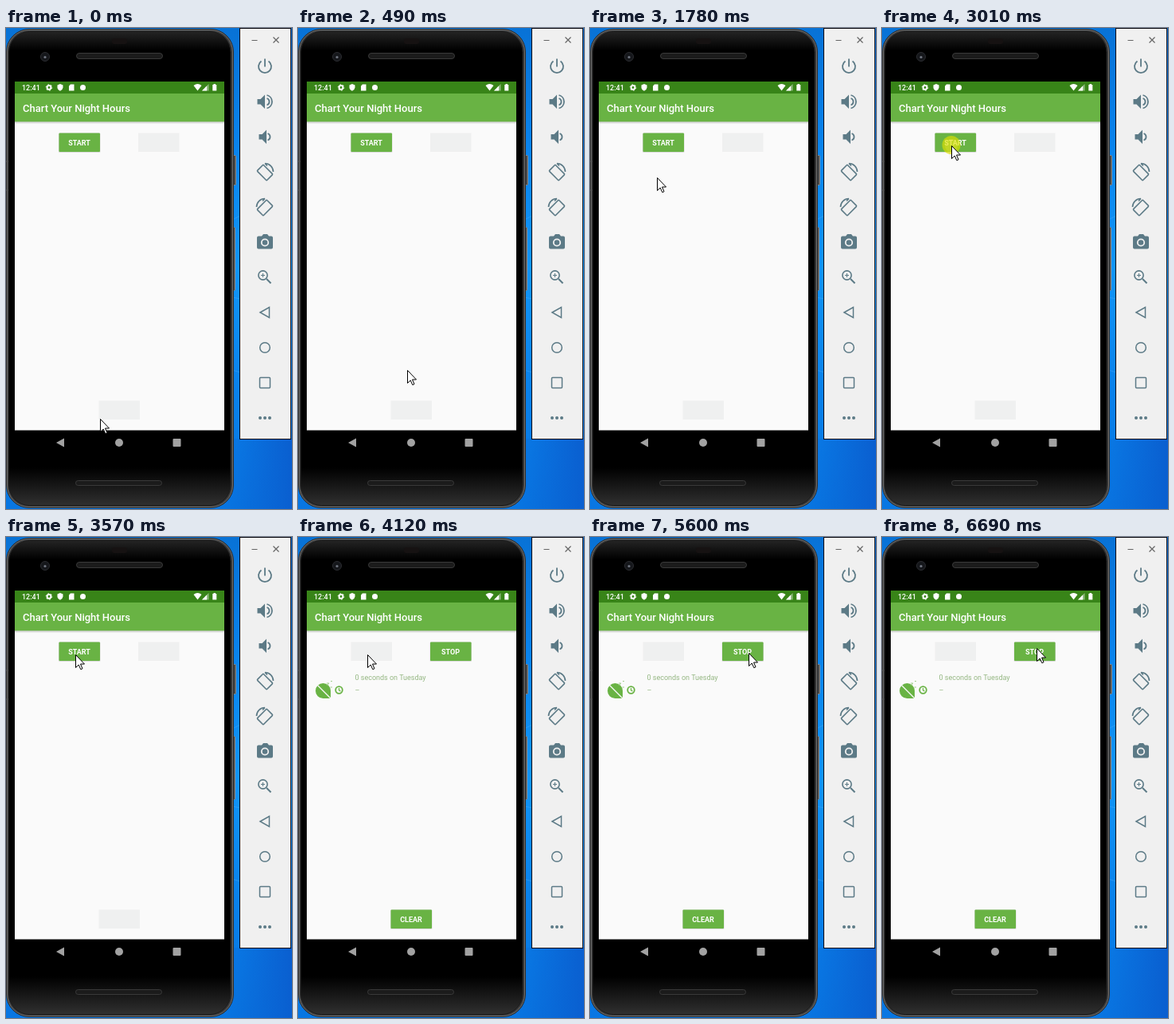
An HTML page for the animation above (8 s loop, 359 px wide and 602 px high).

```html
<!DOCTYPE html>
<html lang="en">
<head>
<meta charset="utf-8">
<title>Sleep tracker demo</title>
<style>
html, body { margin: 0; width: 100%; height: 100%; overflow: hidden; background: #0878e4; }
svg { display: block; width: 359px; height: 602px; }
text { font-family: Roboto, sans-serif; font-size: 9px; }
.label { fill: #fff; font-weight: 700; text-anchor: middle; }
.line { fill: none; stroke: #5c7a86; stroke-width: 1.8; }
.solid { fill: #5c7a86; }
.green { fill: #69b344; }
</style>
</head>
<body>
<svg viewBox="0 0 359 602">
  <defs>
    <linearGradient id="sky" x2="0" y2="1">
      <stop offset="0" stop-color="#0872d6"/>
      <stop offset=".25" stop-color="#0a84ee"/>
      <stop offset=".5" stop-color="#1296f8"/>
      <stop offset=".75" stop-color="#0a82ec"/>
      <stop offset="1" stop-color="#0876e2"/>
    </linearGradient>
    <linearGradient id="dusk">
      <stop offset="0" stop-color="#0a5fd0" stop-opacity="0"/>
      <stop offset="1" stop-color="#0a5fd0"/>
    </linearGradient>
    <linearGradient id="bezel" x2="0" y2="1">
      <stop offset="0" stop-color="#242424"/>
      <stop offset=".04" stop-color="#000"/>
      <stop offset=".92" stop-color="#000"/>
      <stop offset="1" stop-color="#303030"/>
    </linearGradient>
    <linearGradient id="shade" x2="0" y2="1">
      <stop offset="0" stop-color="#000" stop-opacity=".2"/>
      <stop offset="1" stop-color="#000" stop-opacity="0"/>
    </linearGradient>
    <clipPath id="startArea"><rect x="66.500" y="131.500" width="51.500" height="23.500" rx="1"/></clipPath>
  </defs>

  <rect width="359" height="602" fill="url(#sky)"/>
  <rect x="270" y="514" width="89" height="88" fill="url(#dusk)"/>
  <path d="M284 240l10-5M284 337l10 2M284 428l10 3" stroke="#45a6f8" stroke-opacity=".5"/>

  <g id="phone">
    <g fill="#4a4a4a" stroke="#8a8a8a">
      <rect x="284.500" y="159.500" width="4" height="37" rx="1"/>
      <rect x="284.500" y="249.500" width="3" height="79" rx="1"/>
    </g>
    <rect x=".5" y="1.500" width="285" height="599" rx="28.500" fill="#3a3a3a" stroke="#2a2a2a"/>
    <rect x="1.500" y="2.500" width="283" height="597" rx="27.500" fill="none" stroke="#6c6c6c"/>
    <rect x="3.500" y="4.500" width="278.500" height="593" rx="26" fill="url(#bezel)" stroke="#1c1c1c"/>
    <path d="M0 167h3M0 203h3" stroke="#555"/>
    <rect x="133" y="13" width="19" height="7" rx="3" fill="#161212"/>
    <circle cx="49" cy="36" r="5.500" fill="#15171b" stroke="#2b2c30"/>
    <circle cx="49" cy="36.500" r="1.600" fill="#707680"/>
    <g fill="#1b1b1b" stroke="#393939">
      <rect x="88.500" y="31.500" width="108" height="7" rx="3.500"/>
      <rect x="87.500" y="566.500" width="108" height="6" rx="3"/>
    </g>
    <g fill="#a2a2a2">
      <path d="M63 519l10-5.500v11z"/>
      <circle cx="142" cy="519" r="5"/>
      <rect x="209.500" y="514" width="10" height="10" rx="1"/>
    </g>
  </g>

  <g id="screen">
    <rect x="11" y="67" width="263" height="436.500" fill="#fafafa"/>
    <rect x="11" y="67" width="263" height="15" fill="#388418"/>
    <rect x="11" y="82" width="263" height="35.300" class="green"/>
    <rect x="11" y="117.300" width="263" height="3" fill="url(#shade)"/>
    <text x="20" y="78" fill="#fff" font-weight="500">12:41</text>
    <text x="21" y="105" fill="#fff" font-weight="500" style="font-size:13px">Chart Your Night Hours</text>
    <g fill="#fff">
      <circle cx="54" cy="74.500" r="2.400" fill="none" stroke="#fff" stroke-width="2"/>
      <circle cx="54" cy="74.500" r="3.800" fill="none" stroke="#fff" stroke-dasharray="1.500 2.480"/>
      <path d="M68 70l3.500 1.500v3q-.3 3-3.500 4.300q-3.200-1.300-3.500-4.300v-3z"/>
      <path d="M81 70.500h4.500v8h-6.500v-6z"/>
      <circle cx="96.500" cy="74.500" r="3.500"/>
      <path d="M235.500 72q5-4 10 0l-5 6.500z"/>
      <path d="M254.500 70v8.500h-8.500z" fill-opacity=".45"/>
      <path d="M252 72.500v6h-6z"/>
      <path d="M260.500 70h2.500v1h1.300v7.500h-5v-7.500h1.200z"/>
    </g>
    <g id="buttons"></g>
    <g id="record">
      <text x="71.500" y="179" fill="#95b783">0 seconds on Tuesday</text>
      <text x="71.500" y="195" fill="#95b783">–</text>
      <path class="green" d="M41 202H31.500a9.500 9.500 0 1 1 9.500-9.500z"/>
      <path d="M23 184l18 18" stroke="#fafafa" stroke-width="1.300"/>
      <path d="M36 183h3l-3 3M40.500 188h2.500M41 180.500h2" fill="none" stroke="#8fc574" stroke-width=".8"/>
      <circle cx="51.500" cy="191.500" r="4.300" fill="none" stroke="#69b344" stroke-width="1.800"/>
      <path d="M51.500 189v2.800l2 1.200" fill="none" stroke="#69b344" stroke-width="1.200"/>
    </g>
    <g clip-path="url(#startArea)"><circle id="ripple" cx="87" cy="147" fill="#fff"/></g>
    <circle id="press" cx="87" cy="146.500" r="11.500" fill="#dfe000" fill-opacity=".65"/>
  </g>

  <g id="panel">
    <rect x="293.500" y=".5" width="64" height="514" fill="#f0f0f0" stroke="#0c0c14"/>
    <path d="M308.500 15.500h7M335.500 11.500l7 7m0-7l-7 7" fill="none" stroke="#666" stroke-width="1.200"/>
    <g class="line">
      <path d="M325 38.500v10M320.500 41.500a8 8 0 1 0 9 0"/>
      <path d="M327.500 88a4.500 4.500 0 0 1 0 8.500M327.500 84a8.500 8.500 0 0 1 0 16.500"/>
      <path d="M328.500 132a4.500 4.500 0 0 1 0 8.500"/>
      <g id="turn" stroke-width="1.600">
        <rect x="-8.500" y="-5.500" width="17" height="11" rx="1" transform="translate(0 1) rotate(45)"/>
        <path d="M0-10.500a10.500 10.500 0 0 1 10.500 10.500M0-10.500l3 3"/>
      </g>
      <circle cx="322.500" cy="309.500" r="5.600" stroke-width="1.600"/>
      <path d="M327 314l5.500 5.500" stroke-width="2"/>
      <path d="M320 309.500h5m-2.500-2.500v5" stroke-width="1"/>
      <path d="M319 356l11.500-6.500v13z" stroke-width="1.500"/>
      <circle cx="325" cy="400" r="6.300" stroke-width="1.500"/>
      <rect x="318.500" y="437.500" width="13" height="13" rx="1" stroke-width="1.500"/>
    </g>
    <g class="solid">
      <path d="M315.500 89h4l5.500-5.500v17.500l-5.500-5.500h-4z"/>
      <path d="M317.500 133h4l5.500-5.500v17.500l-5.500-5.500h-4z"/>
      <path d="M317 260.500h4l2-2.500h5l2 2.500h3q2 0 2 2v12q0 2-2 2h-16q-2 0-2-2v-12q0-2 2-2z"/>
      <circle cx="319" cy="488" r="2"/><circle cx="325" cy="488" r="2"/><circle cx="331" cy="488" r="2"/>
    </g>
    <circle cx="325" cy="268.500" r="4.200" fill="#5c7a86" stroke="#f0f0f0" stroke-width="1.800"/>
  </g>

  <path id="cursor" d="M.5.500V16.500L4.200 13l2.600 5.700 2.200-1L6.500 12h5z" fill="#fff" stroke="#000" stroke-linejoin="round"/>
</svg>
<script>
const LOOP = 8000, PRESSED = 3010, RIPPLE_TIME = 560, STARTED = 4120;
const $ = id => document.getElementById(id);
const show = (el, on) => el.setAttribute('visibility', on ? 'visible' : 'hidden');
const clamp = v => Math.min(1, Math.max(0, v));

// Hand strokes of the pointer; each is a cubic curve between two resting or turning points
const rest = { low: [118, 489], turn: [156, 365], near: [80, 203], start: [87, 147], stop: [195, 136], end: [194, 139] };
const strokes = [
  { from: 0, to: 1020, curve: [rest.low, [128, 455], [149, 395], rest.turn] },
  { from: 1020, to: 1710, curve: [rest.turn, [120, 290], [-10, 215], rest.near] },
  { from: 1710, to: 2090, curve: [rest.near, [89, 172], [87, 150], rest.start] },
  { from: 4885, to: 5750, curve: [rest.start, [106, 143], [225, 160], rest.stop] },
  { from: 5750, to: 6690, curve: [rest.stop, rest.stop, rest.end, rest.end] }
];

function bezier([a, b, c, d], u) {
  const v = 1 - u;
  return a.map((_, i) => Math.round(
    a[i] * v ** 3 + 3 * b[i] * u * v * v + 3 * c[i] * u * u * v + d[i] * u ** 3));
}

function pointerAt(t) {
  const { from, to, curve } = strokes.findLast(s => t >= s.from);
  return bezier(curve, clamp((t - from) / (to - from)));
}

function makeButton(label, x, y) {
  $('buttons').insertAdjacentHTML('beforeend', `
    <rect x="${x}" y="${y}" width="51.5" height="23.5" fill="#eff0f0"/>
    <g>
      <rect x="${x - .5}" y="${y}" width="52.5" height="24.5" rx="1.5" fill="#000" fill-opacity=".12"/>
      <rect x="${x}" y="${y}" width="51.5" height="23.5" rx="1" class="green"/>
      <text x="${x + 25.5}" y="${y + 15.3}" class="label">${label}</text>
    </g>`);
  return $('buttons').lastElementChild;
}

const start = makeButton('START', 66.5, 131.5);
const stop = makeButton('STOP', 166, 131.5);
const clear = makeButton('CLEAR', 116.5, 466.5);

const turn = $('turn');
const mirrored = turn.cloneNode(true);
mirrored.removeAttribute('id');
turn.setAttribute('transform', 'translate(325 180)');
mirrored.setAttribute('transform', 'translate(325 224) scale(-1 1)');
turn.after(mirrored);

function draw(t) {
  const running = t >= STARTED;
  show(start, !running);
  [stop, clear, $('record')].forEach(el => show(el, running));

  const k = clamp((t - PRESSED) / RIPPLE_TIME);
  show($('press'), t >= PRESSED && k < .4);
  show($('ripple'), k > 0 && k < 1);
  $('ripple').setAttribute('r', 8 + 70 * k);
  $('ripple').setAttribute('opacity', .22 * (1 - k));
  $('cursor').setAttribute('transform', `translate(${pointerAt(t)})`);
}

const origin = performance.now();
function tick() {
  draw((performance.now() - origin) % LOOP);
  requestAnimationFrame(tick);
}
tick();
</script>
</body>
</html>
```
